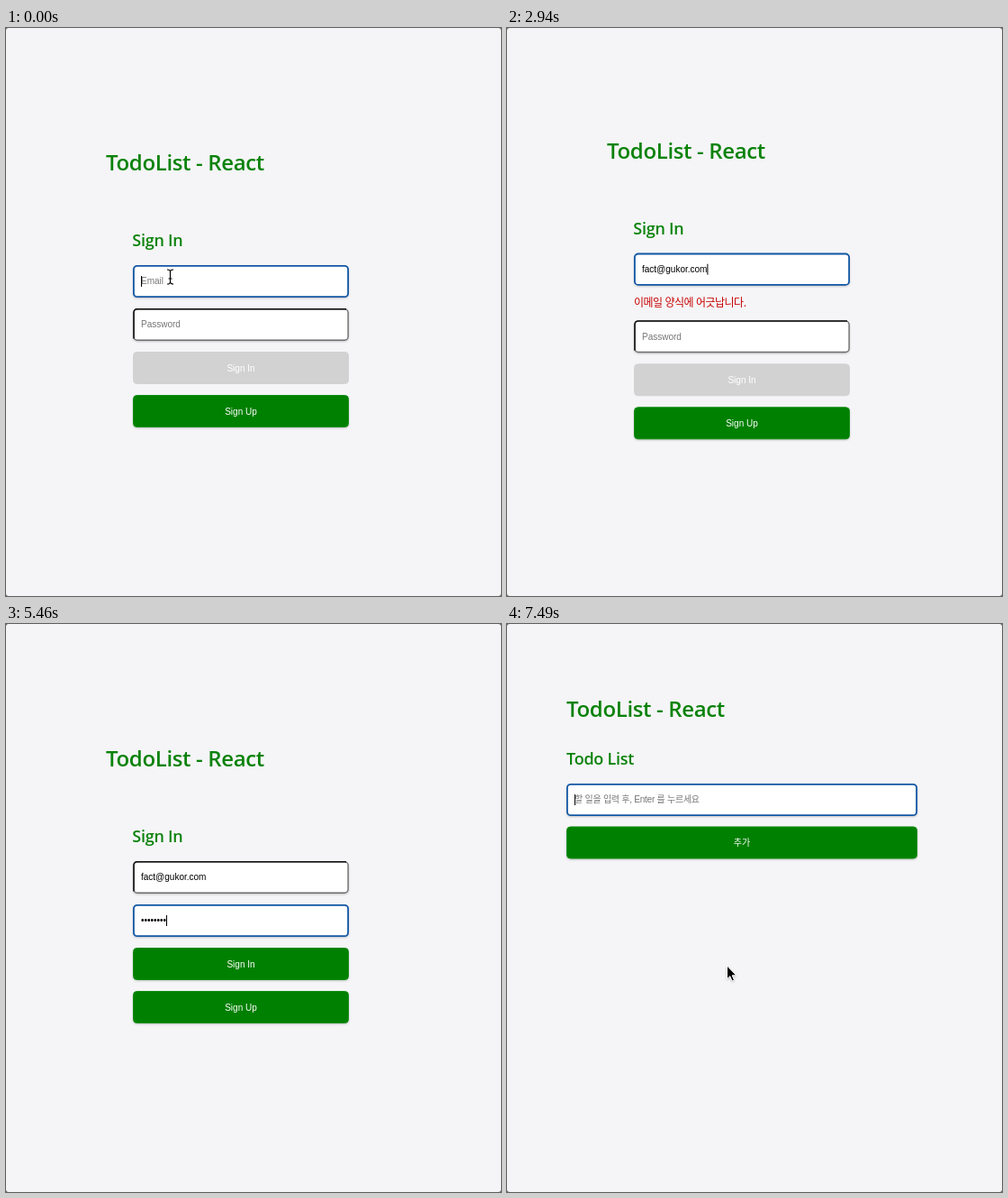
An HTML page that plays this animation: 550 px wide and 630 px high, repeating every 7770 ms.

```html
<!DOCTYPE html>
<html lang="ko">
<head>
<meta charset="utf-8">
<title>TodoList</title>
<style>
html, body { margin: 0; width: 550px; height: 630px; overflow: hidden; background: #666; }
svg { display: block; }
text { font: 10px "Liberation Sans", "Noto Sans CJK KR", "Noto Sans CJK", sans-serif; white-space: pre; }
.h1, .h2 { font: 600 24px "Open Sans", "Noto Sans", sans-serif; letter-spacing: -.015em; fill: #0a820a; }
.h2 { font-size: 18px; }
.hint { fill: #757575; }
.ko { letter-spacing: -.25px; }
.error { font: 12px "Noto Sans CJK KR", "Noto Sans CJK", sans-serif; letter-spacing: -.5px; fill: #c80000; }
.label { text-anchor: middle; fill: #fff; }
.soft { filter: drop-shadow(0 1px 1px #0003); }
</style>
</head>
<body>
<svg id="stage" width="550" height="630"></svg>
<script>
const LOOP = 7770, STEP = 70, SHIFT = 13.3;
const EMAIL = 'fact@gukor.com';
const emailKeys = [700, 840, 1050, 1190, 1610, 1890, 2030, 2100, 2170, 2310, 2380, 2520, 2590, 2940];
const passKeys = [3920, 4060, 4200, 4410, 4900, 4970, 5110, 5390];
// Pointer tip, one point per step from 6160 ms
const trail = [[202, 281], [215, 324], [233, 376], [242, 412], [246, 429], [247, 433],
  [247, 430], [246, 420], [245, 405], [244, 392], [244, 383], [244, 379]];

const stage = document.getElementById('stage');
const pen = document.createElement('canvas').getContext('2d');
pen.font = '10px "Liberation Sans", sans-serif';

const typed = (keys, t) => keys.filter(k => k <= t).length;
const text = (x, y, str, cls = '') => `<text x="${x}" y="${y}" class="${cls}">${str}</text>`;

function field(x, y, w, { value = '', hint, focus, caret, cls = '' }) {
  const rect = (stroke, width) => `<rect x="${x + .9}" y="${y + .8}" width="${w - 1.8}" height="34.4" rx="4"
    fill="#fff" stroke="${stroke}" stroke-width="${width}"/>`;
  const frame = focus ? rect('#1257a5', 1.8) : rect('#6c6c6c', 1.4) +
    `<path d="M${x + 1} ${y + 33.5}V${y + 4.8}q0-4 4-4H${x + w - 3}" fill="none" stroke="#111" stroke-width="1.5"/>`;
  const caretX = x + 9 + pen.measureText(value).width;
  return `<g class="soft">${frame}</g>` +
    text(x + 9, y + 21.2, value || hint, value ? '' : 'hint ' + cls) +
    (caret ? `<rect x="${caretX}" y="${y + 12}" width="1" height="12"/>` : '');
}

function button(x, y, w, label, on = true) {
  return `<rect class="${on ? 'soft' : ''}" x="${x + .5}" y="${y + .5}" width="${w - 1}" height="35" rx="4"
    fill="${on ? '#008000' : '#d2d2d2'}" stroke="${on ? '#108c10' : '#d2d2d2'}"/>` +
    text(x + w / 2, y + 21.5, label, 'label');
}

const arrow = ([x, y]) => `<path class="soft" transform="translate(${x} ${y})" stroke="#fff"
  d="M.5 0V14.8L3.8 11.7 6.1 17 8.5 16 6.2 10.8H10.8Z"/>`;

function beam([x, y]) {
  const d = 'M-3.5-8Q0-8 0-5.5Q0-8 3.5-8M0-6V6M-3.5 8Q0 8 0 5.5Q0 8 3.5 8M-2 2H2';
  return `<g transform="translate(${x} ${y})" fill="none">
    <path d="${d}" stroke="#fff" stroke-width="2.6"/><path d="${d}" stroke="#000" stroke-width="1.2"/></g>`;
}

function cursor(t) {
  if (t < 700) return beam([182.5, 276]);
  if (t < 6160) return '';
  const i = Math.min((t - 6160) / STEP, trail.length - 1);
  return (i < 2 ? beam : arrow)(trail[i]);
}

function signIn(t) {
  const badEmail = t >= 700 && t < 3010;
  const badPass = t >= 3920 && t < 5460;
  const d = badEmail || badPass ? SHIFT : 0;
  const onEmail = t < 3500, onPass = !onEmail && t < 7000;
  const passY = 311 + (badEmail ? d : -d);
  return text(111, 158 - d, 'TodoList - React', 'h1') +
    text(140.3, 242 - d, 'Sign In', 'h2') +
    field(141, 263 - d, 240, {
      value: EMAIL.slice(0, typed(emailKeys, t)), hint: 'Email',
      focus: onEmail, caret: onEmail && (t < 280 || t >= 700)
    }) +
    (badEmail ? text(141, 308.5, '이메일 양식에 어긋납니다.', 'error') : '') +
    field(141, passY, 240, {
      value: '•'.repeat(typed(passKeys, t)), hint: 'Password',
      focus: onPass, caret: onPass && (t < 5950 || t >= 6440 && t < 6930)
    }) +
    (badPass ? text(141, 356.5, '올바르지 않은 비밀번호 양식입니다.', 'error') : '') +
    button(141, 359 + d, 240, 'Sign In', t >= 5460) +
    button(141, 407 + d, 240, 'Sign Up');
}

function todo() {
  return text(66, 102.5, 'TodoList - React', 'h1') +
    text(66, 155.5, 'Todo List', 'h2') +
    field(66, 177, 390, { hint: '할 일을 입력 후, Enter 를 누르세요', focus: true, caret: true, cls: 'ko' }) +
    button(66, 224.5, 390, '추가');
}

let shown = -1;
function draw(now) {
  const t = Math.floor(now % LOOP / STEP) * STEP;
  if (t !== shown) {
    shown = t;
    stage.innerHTML = '<rect width="550" height="630" rx="3" fill="#f5f5f7"/>' +
      (t < 7420 ? signIn(t) : todo()) + cursor(t);
  }
  requestAnimationFrame(draw);
}
draw(performance.now());
</script>
</body>
</html>
```
